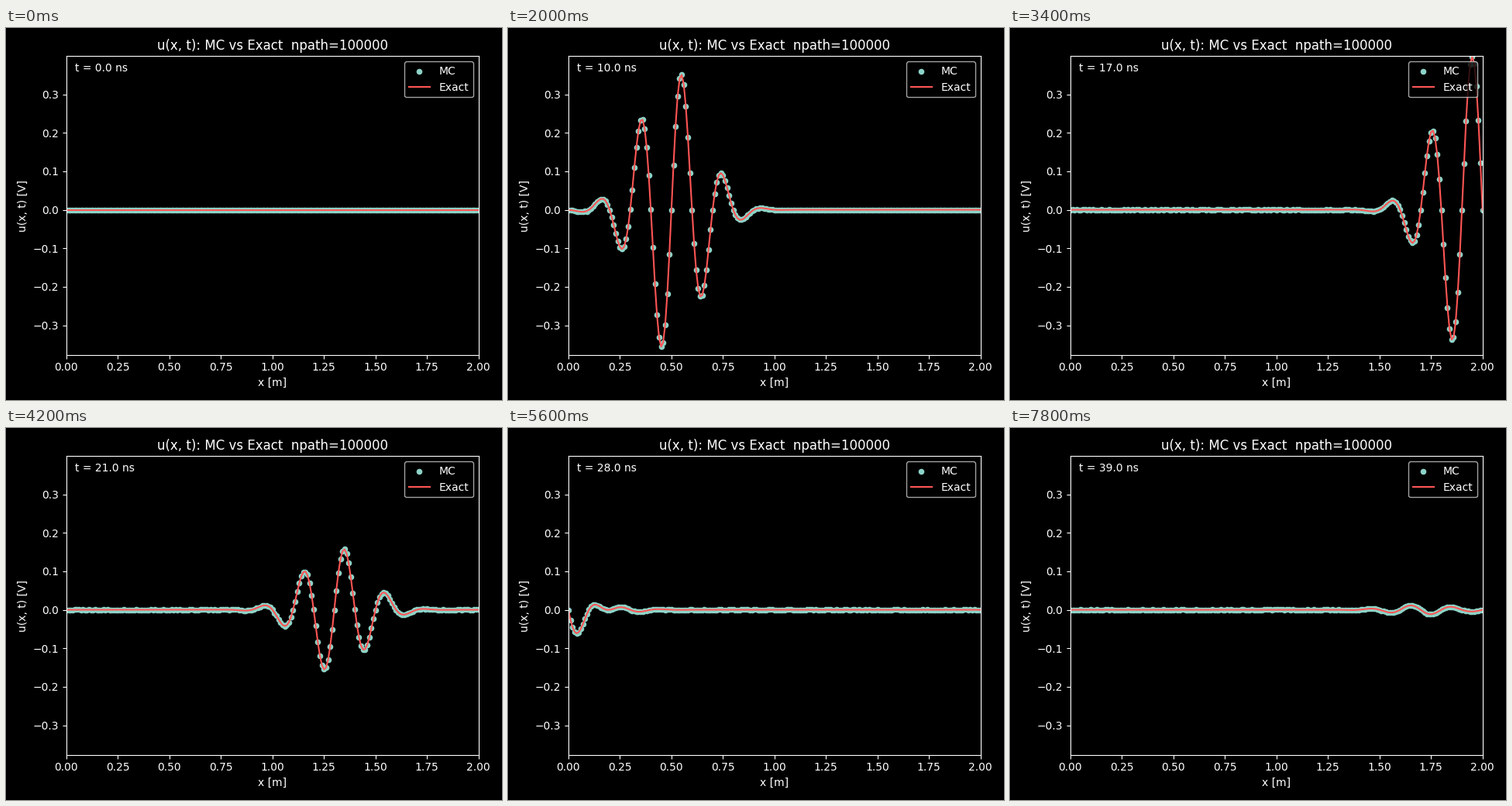
Animation of 640x480 px, one loop 8000 ms. Source, as a matplotlib script:

```python
import numpy as np
import matplotlib.pyplot as plt
from matplotlib.animation import FuncAnimation

plt.style.use("dark_background")

LENGTH = 2.0        # line length [m]
SPEED = 0.2         # wave speed [m/ns]
ALPHA = 0.139       # attenuation [1/m]
R_SRC, R_LOAD = 0.2, -0.6
AMP, CENTER, SIGMA = 0.4, 7.5, 0.75
STEPS = 40

x = np.linspace(0, LENGTH, 201)


def pulse(tau):
    envelope = np.exp(-(tau - CENTER) ** 2 / (2 * SIGMA ** 2))
    return AMP * envelope * np.sin(2 * np.pi * tau)


def travel(path, t):
    return np.exp(-ALPHA * path) * pulse(t - path / SPEED)


def exact(t):
    """Sum of the forward and backward waves over successive round trips."""
    u = np.zeros_like(x)
    for k in range(3):
        gain = (R_SRC * R_LOAD) ** k
        start = 2 * k * LENGTH
        u += gain * travel(start + x, t)
        u += gain * R_LOAD * travel(start + 2 * LENGTH - x, t)
    return u


def sampled(t):
    """Estimate with a little noise where the pulse has already passed."""
    rng = np.random.default_rng(int(t) + 100)
    passed = (t - x / SPEED > CENTER) & (x > 0)
    noise = 0.0012 * np.exp(-t / 25) * rng.standard_normal(x.size)
    return exact(t) + noise * passed


fig, ax = plt.subplots(figsize=(6.4, 4.8), dpi=100)
dots = ax.scatter(x, sampled(0), s=20, label="MC")
line, = ax.plot(x, exact(0), color="#ff5555", lw=1.5, label="Exact")
clock = ax.text(0.02, 0.95, "", transform=ax.transAxes)

ax.set_xlim(0, LENGTH)
ax.set_ylim(-0.3767, 0.399)
ax.set_xlabel("x [m]")
ax.set_ylabel("u(x, t) [V]")
ax.set_title("u(x, t): MC vs Exact  npath=100000")
ax.legend(loc="upper right")
fig.tight_layout()
fig.subplots_adjust(top=fig.subplotpars.top + 1 / 480)  # one pixel taller


def update(i):
    t = float(i)
    dots.set_offsets(np.column_stack([x, sampled(t)]))
    line.set_ydata(exact(t))
    clock.set_text(f"t = {t:.1f} ns")
    return dots, line, clock


anim = FuncAnimation(fig, update, frames=STEPS, interval=200, repeat=True)
plt.show()
```
